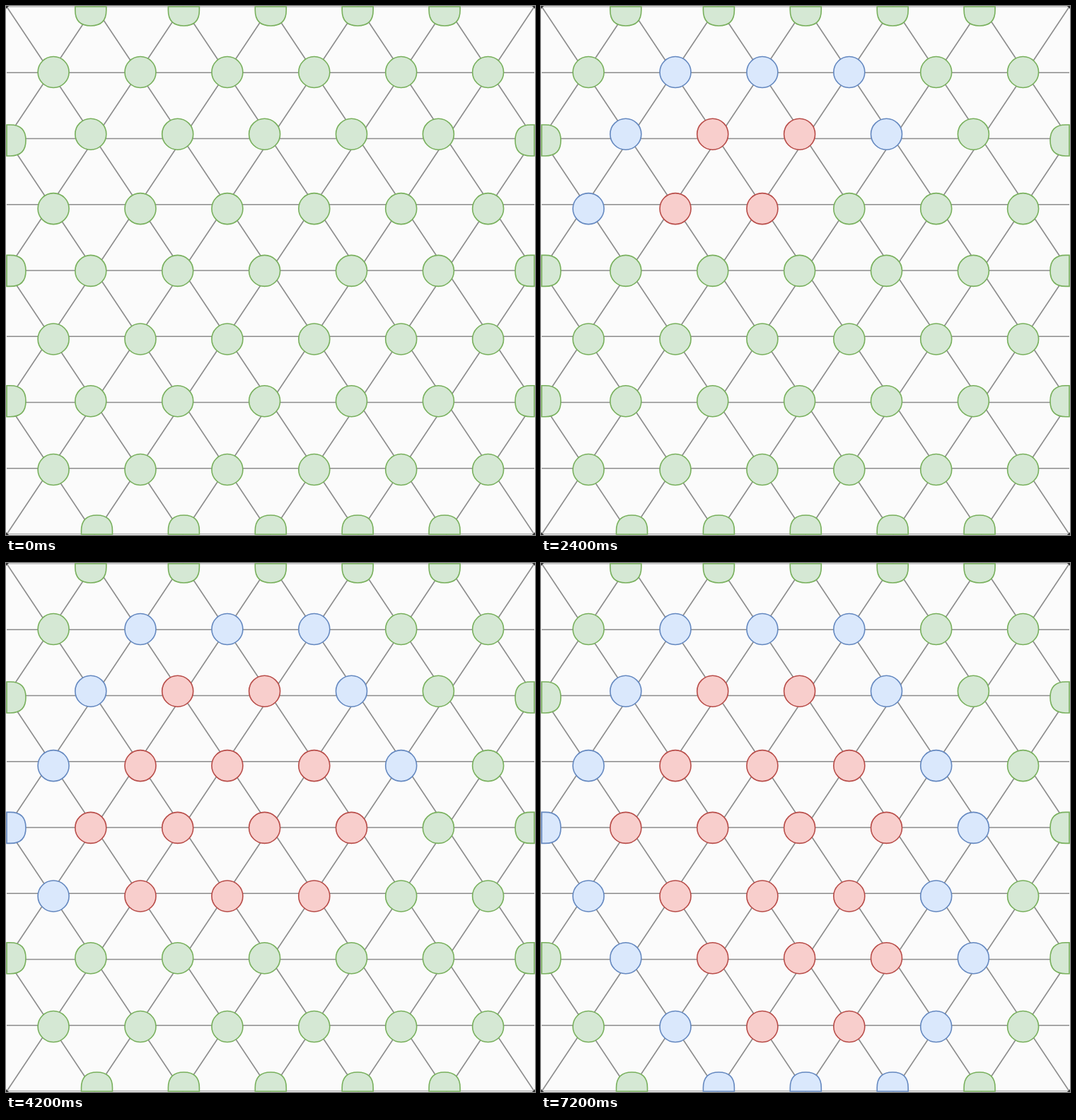
These frames come from a looping animation (748x748 px, 7800 ms). An HTML page with a canvas:

```html
<!DOCTYPE html>
<html lang="en">
<head>
<meta charset="utf-8">
<title>Mesh wavefront</title>
<style>
  html, body { margin: 0; width: 100%; height: 100%; overflow: hidden; background: #fbfbfb; }
  canvas { display: block; width: 748px; height: 748px; }
</style>
</head>
<body>
<canvas id="stage" width="748" height="748"></canvas>
<script>
const ctx = document.getElementById('stage').getContext('2d');
const SIZE = 748, STEP_MS = 600, STEP_COUNT = 13;
const LOW = 1, HIGH = 747, SPAN = HIGH - LOW;
const COL_GAP = 122.9, RADIUS = 22, DEPTH = 27;

const GREEN = { fill: '#d5e8d4', stroke: '#78b05c' };
const BLUE = { fill: '#dae8fc', stroke: '#6488c0' };
const RED = { fill: '#f8cecc', stroke: '#b84c48' };

// Each step recolours a few nodes, named by row and column digits; odd steps red, even steps blue.
const STEPS = [
  '', '22', '11 12 21', '23 31 32', '13 24 30', '33 41 42 43', '34 40 50',
  '44 51 52 53', '45 54 61', '62 63 64', '65 71 74', '72 73', '82 83 84'
].map(ids => ids.split(' '));

const rowY = [LOW, 93.5, 181.2, 286.6, 374.4, 471, 558.7, 655.5, HIGH];

function buildNodes() {
  const nodes = [];
  const add = (row, col, x, y, angle) => nodes.push({ id: `${row}${col}`, x, y, angle });
  for (let row = 1; row < 8; row++) {
    const odd = row % 2 === 1;
    const count = odd ? 6 : 5;
    for (let i = 0; i < count; i++) {
      add(row, odd ? i : i + 1, (odd ? 67.1 : 119.8) + i * COL_GAP, rowY[row]);
    }
    if (!odd) {
      const y = row === 2 ? 190 : rowY[row];
      add(row, 0, LOW, y, 0);
      add(row, 6, HIGH, y, Math.PI);
    }
  }
  for (let col = 1; col <= 5; col++) {
    const x = 374.3 + (col - 3) * COL_GAP;
    add(0, col, col === 1 ? 119.8 : x, LOW, Math.PI / 2);
    add(8, col, x, HIGH, -Math.PI / 2);
  }
  return nodes;
}
const nodes = buildNodes();

function line(x1, y1, x2, y2) {
  ctx.beginPath();
  ctx.moveTo(x1, y1);
  ctx.lineTo(x2, y2);
  ctx.stroke();
}

function drawMesh() {
  ctx.save();
  ctx.beginPath();
  ctx.rect(LOW, 0, SPAN, SIZE);
  ctx.clip();
  ctx.strokeStyle = '#8c8c8c';
  ctx.lineWidth = 1.6;
  for (let row = 1; row < 8; row++) {
    const y = LOW + row * SPAN / 8;
    line(LOW, y, HIGH, y);
  }
  const gap = SPAN / 6;
  for (let i = -4; i <= 6; i++) {
    const top = LOW + i * gap;
    const bottom = top + 4 * gap;
    line(top, LOW, bottom, HIGH);
    line(SIZE - top, LOW, SIZE - bottom, HIGH);
  }
  ctx.strokeStyle = '#a0a0a0';
  ctx.lineWidth = 1.2;
  line(LOW, LOW, HIGH, LOW);
  line(LOW, HIGH - 0.5, HIGH - 0.0, HIGH - 0.5);
  ctx.restore();
}

function drawCorners() {
  ctx.fillStyle = '#333';
  for (const x of [0, SIZE]) {
    for (const y of [0, SIZE]) {
      const dx = x ? -4 : 4, dy = y ? -4 : 4;
      ctx.beginPath();
      ctx.moveTo(x, y);
      ctx.lineTo(x + dx, y);
      ctx.lineTo(x, y + dy);
      ctx.fill();
    }
  }
}

// Flat side on the stage edge, rounded side pointing along the angle.
function edgeShape({ x, y, angle }) {
  ctx.translate(x, y);
  ctx.rotate(angle);
  ctx.moveTo(0, -RADIUS);
  ctx.lineTo(DEPTH - RADIUS, -RADIUS);
  ctx.quadraticCurveTo(DEPTH, -RADIUS, DEPTH, 0);
  ctx.quadraticCurveTo(DEPTH, RADIUS, DEPTH - RADIUS, RADIUS);
  ctx.lineTo(0, RADIUS);
  ctx.closePath();
}

function drawNode(node, color) {
  ctx.save();
  ctx.beginPath();
  if (node.angle === undefined) ctx.arc(node.x, node.y, RADIUS, 0, Math.PI * 2);
  else edgeShape(node);
  ctx.fillStyle = color.fill;
  ctx.strokeStyle = color.stroke;
  ctx.lineWidth = 1.6;
  ctx.fill();
  ctx.stroke();
  ctx.restore();
}

function colorAt(id, step) {
  const changed = STEPS.findIndex(ids => ids.includes(id));
  if (changed < 0 || changed > step) return GREEN;
  return changed % 2 ? RED : BLUE;
}

function draw(step) {
  ctx.fillStyle = '#fbfbfb';
  ctx.fillRect(0, 0, SIZE, SIZE);
  drawMesh();
  drawCorners();
  for (const node of nodes) drawNode(node, colorAt(node.id, step));
}

const start = performance.now();
let shown = 0;
function tick() {
  const step = Math.floor((performance.now() - start) / STEP_MS) % STEP_COUNT;
  if (step !== shown) draw(shown = step);
  requestAnimationFrame(tick);
}
draw(0);
requestAnimationFrame(tick);
</script>
</body>
</html>
```
